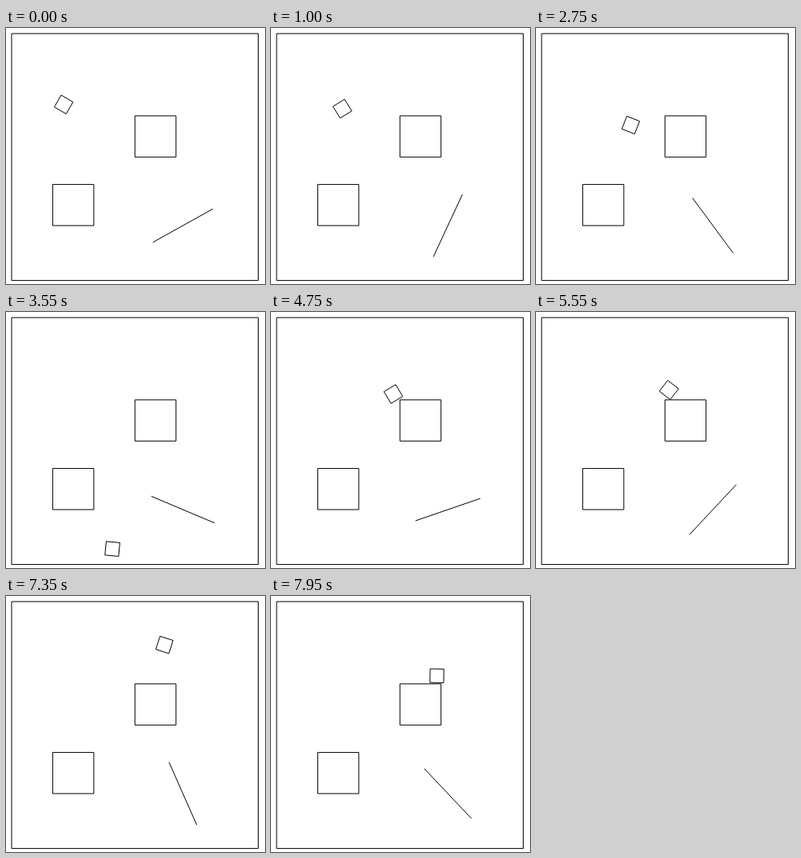
Animation, 324 px wide and 320 px high, one loop 8 s. Source, as an HTML page:

```html
<!DOCTYPE html>
<html lang="en">
<head>
<meta charset="utf-8">
<title>Tumbling square</title>
<style>
  html, body { margin: 0; width: 100%; height: 100%; overflow: hidden; background: #fff; }
  svg { display: block; }
  g { fill: none; stroke: #000; }
  g * { vector-effect: non-scaling-stroke; }
</style>
</head>
<body>
<svg width="324" height="320" viewBox="0 0 324 320">
  <!-- The room is 18 units wide. -->
  <g transform="translate(7 7) scale(17.143)">
    <rect width="18" height="18"/>
    <rect x="3" y="11" width="3" height="3"/>
    <rect x="9" y="6" width="3" height="3"/>
    <path id="rod" d="M-2.5 0H2.5"/>
    <rect id="square" x="-.5" y="-.5" width="1" height="1"/>
  </g>
</svg>
<script>
const LOOP = 8, REFRESH = .0775, GRAVITY = 9.8;
const rod = document.getElementById('rod');
const square = document.getElementById('square');

// Bounces: seconds, height and turn of the square; gravity bends the path between them.
const bounces = [
  { t: 0, y: 5.17, turn: 30 },
  { t: .514, y: 10.35, turn: 69 },
  { t: 3.524, y: 17.38, turn: 1117 },
  { t: 5.48, y: 5.35, turn: -761 },
  { t: 6.512, y: 5.37, turn: -1567 },
  { t: 7.897, y: 5.41, turn: -2069 }
];

const mix = (a, b, p) => a + (b - a) * p;

function place(node, x, y, angle) {
  node.setAttribute('transform', `translate(${x} ${y}) rotate(${angle})`);
}

function draw(seconds) {
  // The picture holds still between refreshes.
  const t = Math.max(0, REFRESH * Math.floor((seconds + .02) / REFRESH) - .008);
  const next = bounces.findIndex(b => b.t > t);
  const to = bounces.at(next), from = bounces.at(next < 0 ? -2 : next - 1);
  const p = (t - from.t) / (to.t - from.t);
  const drop = GRAVITY / 2 * (t - from.t) * (t - to.t);
  place(square, 3.8 + t, mix(from.y, to.y, p) + drop, mix(from.turn, to.turn, p));
  place(rod, 12.5, 14, -29.1 - 36 * t);
}

const begin = performance.now();
function frame() {
  draw((performance.now() - begin) / 1000 % LOOP);
  requestAnimationFrame(frame);
}
frame();
</script>
</body>
</html>
```
